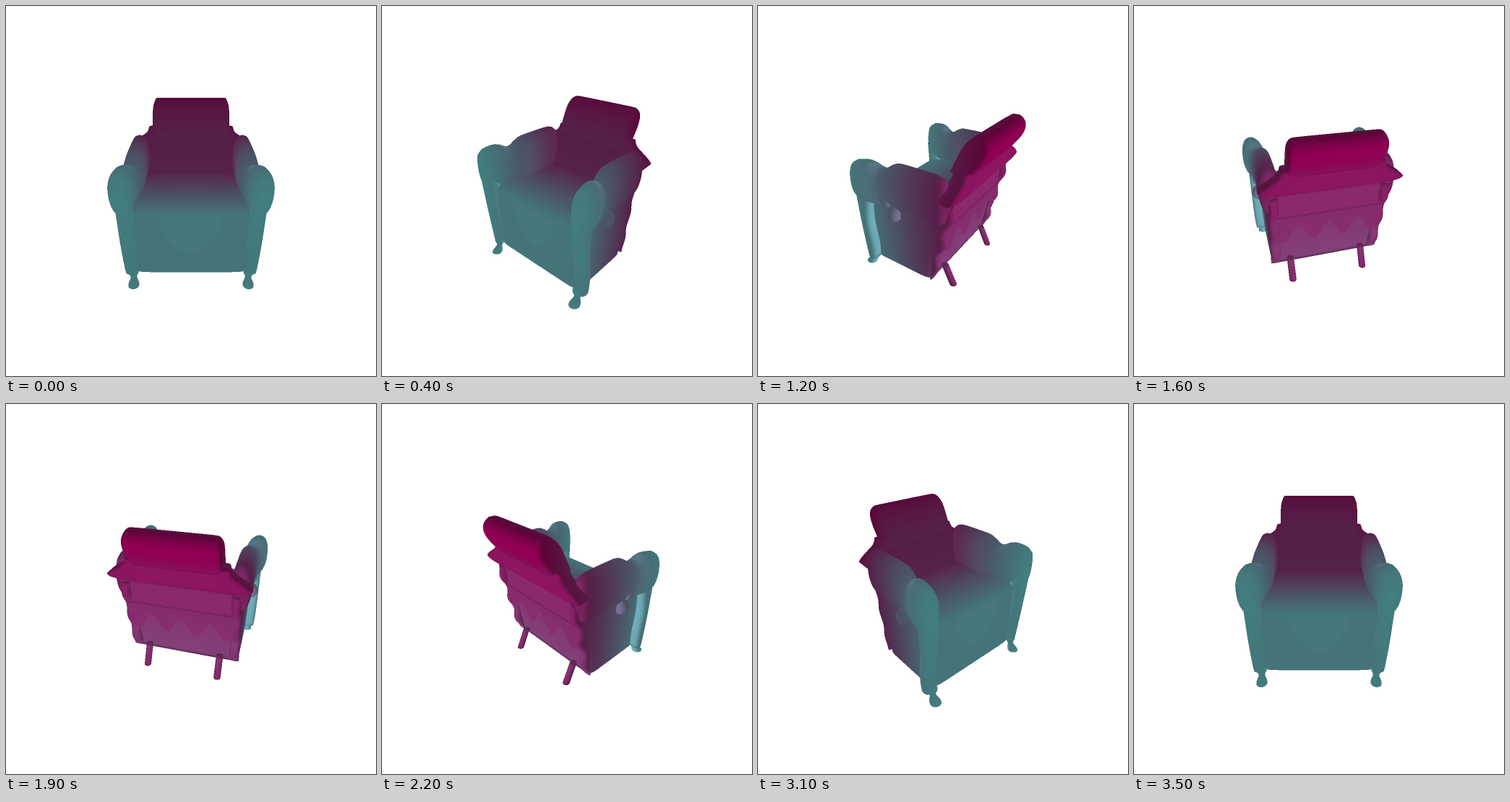
Write an HTML page with a canvas that moves like this. It is 512 px wide and 512 px high and loops after 3.6 s.

```html
<!DOCTYPE html>
<html lang="en">
<head>
<meta charset="utf-8">
<title>Armchair turntable</title>
<style>
html, body { margin: 0; width: 100%; height: 100%; overflow: hidden; background: #fff; }
canvas { display: block; width: 512px; height: 512px; }
</style>
</head>
<body>
<canvas id="stage" width="512" height="512"></canvas>
<script>
const SIZE = 512, SCALE = 2, W = SIZE * SCALE;
const FOCAL = W / 2 / Math.tan(Math.PI / 6);
const DISTANCE = 3, ELEVATION = Math.PI / 6;
const STEP_MS = 100, STEPS = 36;
const AMBIENT = 0.5, DIFFUSE = 0.3, LIGHT = [0, 0, -3];

// Paint blends evenly along the chair's depth
const BACK_Z = -0.6, FRONT_Z = 0.54;
const BACK_PAINT = [184, 0, 106], FRONT_PAINT = [134, 252, 252];

const clamp = (v, lo = 0, hi = 1) => Math.min(hi, Math.max(lo, v));
const mix = (a, b, t) => a + (b - a) * t;
const smooth = (lo, hi, v) => { const t = clamp((v - lo) / (hi - lo)); return t * t * (3 - 2 * t); };
const tent = (v, mid, width) => clamp(1 - Math.abs(v - mid) / width);
const bell = (v, mid, width) => Math.exp(-(((v - mid) / width) ** 2));

const sub = (a, b) => a.map((v, i) => v - b[i]);
const dot = (a, b) => a[0] * b[0] + a[1] * b[1] + a[2] * b[2];
const unit = a => { const l = Math.hypot(...a) || 1; return a.map(v => v / l); };
const cross = (a, b) => [
  a[1] * b[2] - a[2] * b[1],
  a[2] * b[0] - a[0] * b[2],
  a[0] * b[1] - a[1] * b[0]
];

const vertices = [], triangles = [];

function addVertex(p, light) {
  vertices.push({ p, light });
  return vertices.length - 1;
}

function shade(p, n) {
  return AMBIENT + DIFFUSE * Math.max(0, dot(n, unit(sub(LIGHT, p))));
}

// Closed skin over a stack of rings, with smooth normals pointing outwards
function skin(rings) {
  const n = rings[0].length, last = rings.length - 1;
  const all = rings.flat();
  const middle = [0, 1, 2].map(k => all.reduce((s, p) => s + p[k], 0) / all.length);
  const normals = rings.map((ring, i) => ring.map((p, j) => unit(cross(
    sub(rings[Math.min(last, i + 1)][j], rings[Math.max(0, i - 1)][j]),
    sub(ring[(j + 1) % n], ring[(j + n - 1) % n])
  ))));
  let facing = 0;
  rings.forEach((ring, i) => ring.forEach((p, j) => { facing += dot(normals[i][j], sub(p, middle)); }));
  const sign = Math.sign(facing);
  const ids = rings.map((ring, i) => ring.map((p, j) =>
    addVertex(p, shade(p, normals[i][j].map(v => v * sign)))));
  for (let i = 0; i < last; i++) {
    for (let j = 0; j < n; j++) {
      const k = (j + 1) % n;
      triangles.push([ids[i][j], ids[i + 1][j], ids[i][k]], [ids[i][k], ids[i + 1][j], ids[i + 1][k]]);
    }
  }
}

// Stack of rounded sections; section(t) gives centre x, y, z and two radii.
// Level sections spread over x and z, others over x and y.
function loft(section, { power = 1, level = true, count = 16 } = {}) {
  const bend = v => Math.sign(v) * Math.abs(v) ** power;
  const ring = (t, size) => {
    const [x, y, z, r1, r2] = section(t);
    return Array.from({ length: 32 }, (_, j) => {
      const a = (j + 0.5) * Math.PI / 16;
      const c = bend(Math.cos(a)) * r1 * size, s = bend(Math.sin(a)) * r2 * size;
      return level ? [x + c, y, z + s] : [x + c, y + s, z];
    });
  };
  const rings = Array.from({ length: count + 1 }, (_, i) => ring(i / count, 1));
  return [ring(0, 0.01), ...rings, ring(1, 0.01)];
}

const between = (front, back) => [(front + back) / 2, (front - back) / 2];

// Slab standing up: front and back depth instead of centre and radius
const slab = (x, y, width, front, back) => {
  const [z, r] = between(front, back);
  return [x, y, z, width, r];
};

function pair(rings) {
  skin(rings);
  skin(rings.map(r => r.map(([x, y, z]) => [-x, y, z])));
}

// Cloth hanging from a straight edge down to a shaped hem
function drape(width, top, hem, depth, light) {
  const count = 24;
  let previous;
  for (let i = 0; i <= count; i++) {
    const x = width * (2 * i / count - 1);
    const edge = [top, hem(x)].map(y => addVertex([x, y, depth(y)], light));
    if (previous) {
      triangles.push([previous[0], previous[1], edge[0]], [edge[0], previous[1], edge[1]]);
    }
    previous = edge;
  }
}

// Body with the seat on top
skin(loft(t => slab(0, mix(-0.59, 0.04, t), mix(0.51, 0.53, t), 0.45, mix(-0.21, -0.32, t)), { power: 0.15 }));

// Back, flaring into shoulders and narrowing towards the crest
skin(loft(t => slab(
  0, mix(0, 0.475, t),
  0.51 + 0.08 * tent(t, 0.64, 0.22) - 0.1 * smooth(0.64, 1, t),
  mix(-0.27, -0.34, t),
  -0.36 - 0.12 * smooth(0.42, 0.64, t)
), { power: 0.3, count: 25 }));

// Crest, rolled over backwards
skin(loft(t => slab(
  0, mix(0.43, 0.73, t),
  0.365 - 0.03 * t ** 8,
  -0.28 - 0.13 * t - 0.06 * t ** 6,
  -0.48 - 0.13 * Math.sin(2 * t) + 0.05 * t ** 8
), { power: 0.25 }));

// Arms, dipping before the front scroll
pair(loft(t => {
  const z = mix(-0.4, 0.55, t);
  const scroll = bell(z, 0.43, 0.12), dip = bell(z, 0.23, 0.08);
  const taper = Math.sqrt(1.001 - Math.abs(2 * t - 1) ** 10);
  return [
    0.49 + 0.065 * smooth(0.1, 0.5, z), 0.235 - 0.02 * dip, z,
    (0.085 + 0.012 * scroll) * taper, (0.215 - 0.05 * dip - 0.02 * scroll) * taper
  ];
}, { power: 0.85, level: false, count: 24 }));

// Front posts
pair(loft(t => slab(0.54, mix(-0.59, 0.2, t), 0.062 - 0.01 * (1 - t) ** 8,
  mix(0.48, 0.54, t), 0.38 - 0.012 * Math.sin(9 * t)), { power: 0.75 }));

// Scalloped back corners
pair(loft(t => slab(0.475, mix(-0.58, 0.22, t), 0.045, -0.2,
  mix(-0.24, -0.42, t) + 0.018 * Math.cos(6 * Math.PI * t)), { power: 0.75, count: 24 }));

// Folds running down the sides
for (let i = 0; i < 3; i++) {
  const y = mix(0.19, 0, i / 2), z = mix(0.28, 0.13, i / 2), size = 0.075 - 0.02 * (i % 2);
  pair(loft(t => {
    const r = Math.sin(Math.PI * mix(0.03, 0.97, t)) * size;
    return [0.53, y, z - Math.cos(Math.PI * t) * 0.06, r, r];
  }, { level: false }));
}

// Legs: bent feet in front, straight posts behind
pair(loft(t => {
  const r = 0.028 + 0.022 * Math.cos(Math.PI * t) ** 2;
  return [0.52, mix(-0.57, -0.7, t), 0.45 + 0.05 * t * t, r, r];
}));
pair(loft(t => [0.345, mix(-0.52, -0.71, t), mix(-0.25, -0.34, t), 0.032, 0.032]));

// Cloth on the back and the front
drape(0.49, 0.22, x => -0.2 + 0.09 * Math.cos(2 * Math.PI * x / 0.27), y => -0.345 - 0.08 * y, 0.78);
drape(0.25, 0.02, x => -0.37 + 4.5 * x * x, () => 0.455, 0.512);

const ctx = document.getElementById('stage').getContext('2d');
const buffer = document.createElement('canvas');
buffer.width = buffer.height = W;
const bufferCtx = buffer.getContext('2d');
const image = bufferCtx.createImageData(W, W);
const pixels = new Uint32Array(image.data.buffer);
const nearness = new Float32Array(W * W);

function project({ p: [x, y, z], light }, angle) {
  const ca = Math.cos(angle), sa = Math.sin(angle);
  const ce = Math.cos(ELEVATION), se = Math.sin(ELEVATION);
  const toward = x * sa + z * ca;
  const q = 1 / (DISTANCE - toward * ce - y * se);
  return {
    x: W / 2 + FOCAL * (x * ca - z * sa) * q,
    y: W / 2 - FOCAL * (y * ce - toward * se) * q,
    q, zq: z * q, lq: light * q
  };
}

function colorAt(z, light) {
  const t = clamp((z - BACK_Z) / (FRONT_Z - BACK_Z));
  const channel = k => mix(BACK_PAINT[k], FRONT_PAINT[k], t) * light;
  return 0xff000000 | channel(2) << 16 | channel(1) << 8 | channel(0);
}

function fillTriangle(a, b, c) {
  const area = (b.x - a.x) * (c.y - a.y) - (b.y - a.y) * (c.x - a.x);
  if (Math.abs(area) < 1e-6) return;
  const first = (u, v, w) => Math.max(0, Math.ceil(Math.min(u, v, w) - 0.5));
  const last = (u, v, w) => Math.min(W - 1, Math.floor(Math.max(u, v, w) - 0.5));
  const x0 = first(a.x, b.x, c.x), x1 = last(a.x, b.x, c.x);
  const y0 = first(a.y, b.y, c.y), y1 = last(a.y, b.y, c.y);
  for (let y = y0; y <= y1; y++) {
    for (let x = x0; x <= x1; x++) {
      const px = x + 0.5, py = y + 0.5;
      const u = ((b.x - px) * (c.y - py) - (b.y - py) * (c.x - px)) / area;
      const v = ((c.x - px) * (a.y - py) - (c.y - py) * (a.x - px)) / area;
      const w = 1 - u - v;
      if (u < 0 || v < 0 || w < 0) continue;
      const q = u * a.q + v * b.q + w * c.q, at = y * W + x;
      if (q <= nearness[at]) continue;
      nearness[at] = q;
      pixels[at] = colorAt(
        (u * a.zq + v * b.zq + w * c.zq) / q,
        (u * a.lq + v * b.lq + w * c.lq) / q
      );
    }
  }
}

function render(angle) {
  pixels.fill(0xffffffff);
  nearness.fill(0);
  const points = vertices.map(v => project(v, angle));
  for (const [a, b, c] of triangles) fillTriangle(points[a], points[b], points[c]);
  bufferCtx.putImageData(image, 0, 0);
  ctx.drawImage(buffer, 0, 0, SIZE, SIZE);
}

let shown = -1;
const start = performance.now();
function tick() {
  const step = Math.floor((performance.now() - start) / STEP_MS) % STEPS;
  if (step !== shown) {
    shown = step;
    // First and last step share the same pose
    render(step * 2 * Math.PI / (STEPS - 1));
  }
  requestAnimationFrame(tick);
}
tick();
</script>
</body>
</html>
```
